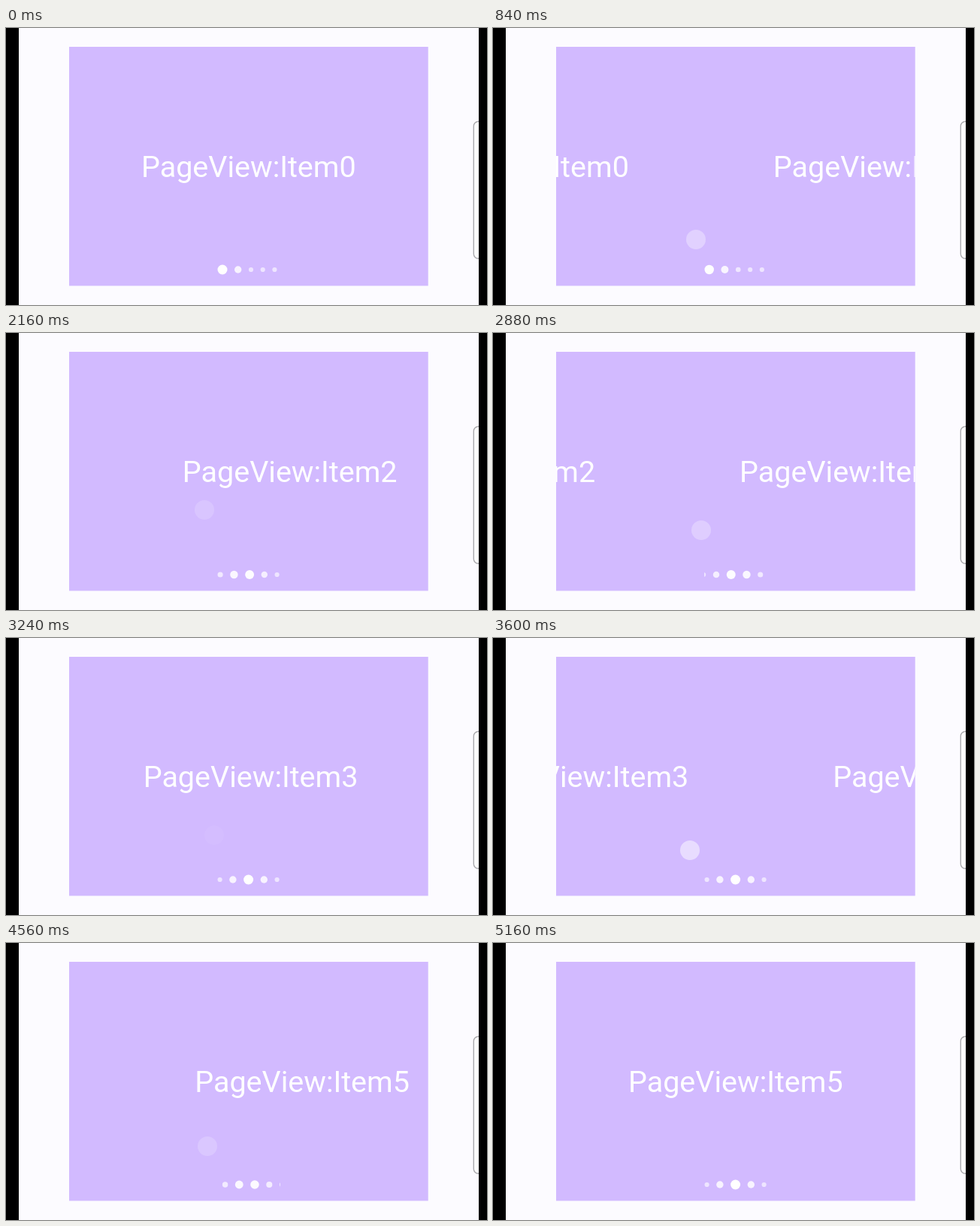
An HTML page with a canvas for the animation above (5.28 s loop, 640x368 px).

```html
<!DOCTYPE html>
<html lang="en">
<head>
<meta charset="utf-8">
<style>
html, body { margin: 0; width: 640px; height: 368px; overflow: hidden; background: #fcfbff; }
canvas { display: block; }
</style>
</head>
<body>
<canvas id="stage" width="640" height="368"></canvas>
<script>
const ctx = document.getElementById('stage').getContext('2d');
const LOOP = 5280;
const CARD = { x: 84, y: 25, w: 477.7, h: 317.5 };
const CENTER = 322.8;
const DRAGGED = 0.43;    // part of a page covered while the finger is down
const SPRING = 14.14;    // critically damped settling rate, 1/s
const CROSS_DELAY = 40;  // ms from release until the page passes halfway
const DOT_TIME = 245;

const swipes = [
  { down: 610, up: 765, x: 270, y: 281 },
  { down: 1740, up: 1950, x: 264, y: 235 },
  { down: 2600, up: 2772, x: 277, y: 262 },
  { down: 3420, up: 3600, x: 262, y: 282 },
  { down: 4180, up: 4375, x: 268, y: 270 }
];

const clamp = v => Math.max(0, Math.min(1, v));
const lerp = (a, b, k) => a + (b - a) * k;

function dragPart(s, t) {
  return DRAGGED * clamp((t - s.down) / (s.up - s.down)) ** 1.3;
}

function pagePart(s, t) {
  if (t <= s.up) return dragPart(s, t);
  const k = SPRING * (t - s.up) / 1000;
  return 1 - (1 - DRAGGED) * (1 + k) * Math.exp(-k);
}

function disc(x, y, r, alpha) {
  ctx.fillStyle = `rgba(255,255,255,${alpha})`;
  ctx.beginPath();
  ctx.arc(x, y, r, 0, Math.PI * 2);
  ctx.fill();
}

function clipped(x, y, w, h, draw) {
  ctx.save();
  ctx.beginPath();
  ctx.rect(x, y, w, h);
  ctx.clip();
  draw();
  ctx.restore();
}

function drawPages(page) {
  ctx.fillStyle = '#d2baff';
  ctx.fillRect(CARD.x, CARD.y, CARD.w, CARD.h);
  clipped(CARD.x, CARD.y, CARD.w, CARD.h, () => {
    ctx.fillStyle = '#fff';
    ctx.font = '39.5px Roboto, sans-serif';
    ctx.textAlign = 'center';
    for (let i = Math.floor(page); i <= Math.ceil(page); i++) {
      ctx.fillText('PageView:Item' + i, CENTER + (i - page) * CARD.w, 197.6);
    }
  });
}

// Radius and opacity fall off with distance from the active dot.
function dotStyle(distance) {
  return distance < 1
    ? { r: lerp(6.5, 4.7, distance), a: lerp(1, 0.83, distance) }
    : { r: lerp(4.7, 3.1, clamp(distance - 1)), a: lerp(0.83, 0.62, clamp(distance - 1)) };
}

function drawDots(active) {
  const gap = 9.5;
  clipped(281, 310, 84, 22, () => {
    let x = 281.5 - Math.max(0, active - 2) * (6.2 + gap);
    for (let i = 0; i < 10; i++) {
      const { r, a } = dotStyle(Math.abs(i - active));
      disc(x + r, 321, r, a);
      x += 2 * r + gap;
    }
  });
}

function drawTouch(s, t) {
  if (t < s.down) return;
  const alpha = 0.5 * Math.exp(-Math.max(0, t - s.up) / 195);
  if (alpha < 0.015) return;
  const x = s.x + (DRAGGED - dragPart(s, t)) * CARD.w;
  disc(x, s.y, 13, alpha);
}

function drawFrame() {
  ctx.fillStyle = '#000';
  ctx.fillRect(0, 0, 17, 368);
  ctx.fillRect(629, 0, 11, 368);
  clipped(610, 110, 19, 210, () => {
    ctx.fillStyle = '#fff';
    ctx.strokeStyle = '#a9a8ac';
    ctx.lineWidth = 1.4;
    ctx.beginPath();
    ctx.roundRect(622.3, 124.3, 30, 182, 6);
    ctx.fill();
    ctx.stroke();
  });
}

function render(t) {
  let page = 0, active = 0;
  for (const s of swipes) {
    page += pagePart(s, t);
    active += clamp((t - s.up - CROSS_DELAY) / DOT_TIME);
  }
  // Snap once the remaining distance is below a pixel fraction.
  if (Math.abs(page - Math.round(page)) < 0.0008) page = Math.round(page);
  ctx.fillStyle = '#fcfbff';
  ctx.fillRect(0, 0, 640, 368);
  drawPages(page);
  drawDots(active);
  swipes.forEach(s => drawTouch(s, t));
  drawFrame();
}

function tick() {
  render(performance.now() % LOOP);
  requestAnimationFrame(tick);
}
tick();
</script>
</body>
</html>
```
